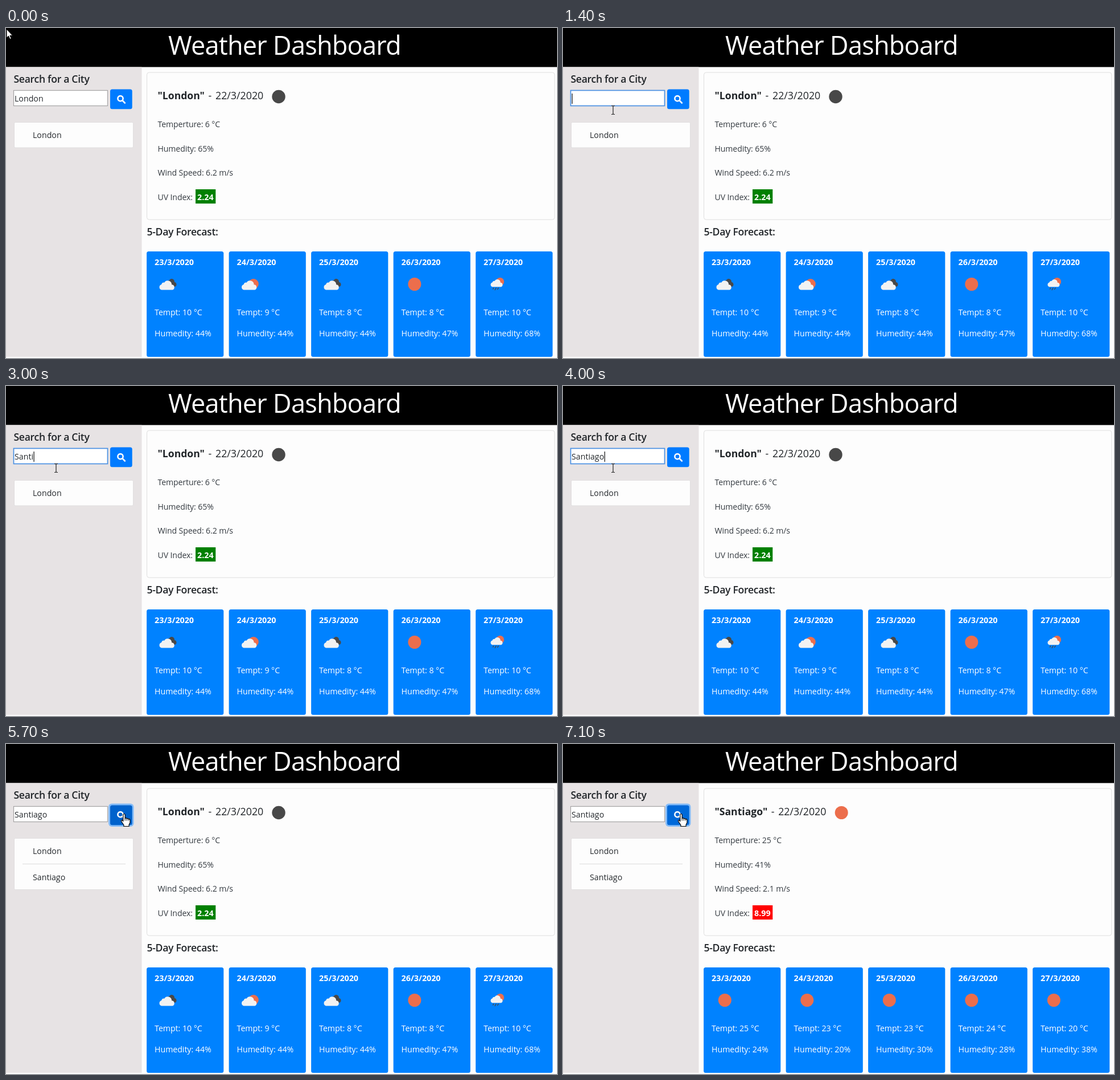
An HTML page that plays this animation: 968x579 px, repeating every 7.2 s.

```html
<!DOCTYPE html>
<html lang="en">
<head>
<meta charset="utf-8">
<title>Weather Dashboard</title>
<style>
  html, body { margin: 0; width: 100%; height: 100%; overflow: hidden; background: #fdfdfd; }
  svg { display: block; width: 968px; height: 579px; font-family: "Open Sans", "Noto Sans", sans-serif; }
  text { white-space: pre; }
  .title { font-size: 45px; letter-spacing: -.75px; fill: #fff; }
  .head { font-size: 17.6px; font-weight: 600; letter-spacing: -.3px; fill: #212529; }
  .city { font-size: 17.6px; font-weight: 700; fill: #212529; }
  .date { font-size: 17.8px; font-weight: 500; fill: #212529; }
  .body { font-size: 14.1px; letter-spacing: -.1px; fill: #343a40; }
  .entry { font-size: 14.2px; fill: #24282c; }
  .card { font-size: 14.2px; letter-spacing: -.05px; fill: #fff; }
  .strong { font-size: 14.3px; font-weight: 700; fill: #fff; }
</style>
</head>
<body>
<svg viewBox="0 0 968 579">
  <defs>
    <path id="cloud" d="M5 18a5 5 0 0 1 0-9.6 4.5 4.5 0 0 1 5-3.3 7 7 0 0 1 13 3.6 4.8 4.8 0 0 1 1.5 9.3z"/>
    <g id="sun"><circle cx="16.5" cy="11.5" r="11.5" fill="#ec6e4c"/></g>
    <g id="moon"><circle cx="16.5" cy="11.5" r="11.7" fill="#484848"/></g>
    <g id="clouds">
      <use href="#cloud" transform="translate(11.5 .5) scale(.73 .85)" fill="#484848"/>
      <use href="#cloud" transform="translate(.3 3.6)" fill="#f2f2f2"/>
    </g>
    <g id="partly">
      <circle cx="22.5" cy="11" r="9" fill="#ec6e4c"/>
      <use href="#cloud" transform="translate(.3 3.6)" fill="#f2f2f2"/>
    </g>
    <g id="rain">
      <circle cx="22.2" cy="7" r="7" fill="#ec6e4c"/>
      <use href="#cloud" transform="translate(4.5 1.8) scale(.8)" fill="#f2f2f2"/>
      <path d="M11 17.5l-1.5 3M15.5 17.5l-2.5 4.5M19.5 17.5l-2 3.5" stroke="#484848" stroke-width="1.5"/>
    </g>
  </defs>

  <rect width="968" height="579" fill="#fdfdfd"/>
  <rect width="968" height="68.5" fill="#000"/>
  <text class="title" x="285" y="47">Weather Dashboard</text>

  <rect y="68.5" width="238.5" height="508.5" fill="#e7e3e4"/>
  <text class="head" x="13.5" y="96">Search for a City</text>
  <rect id="box" x="13.5" y="109.5" width="165" height="27" fill="#fff"/>
  <rect id="mark" x="15" y="113" height="20" fill="#3390ff"/>
  <text id="field" class="entry" x="15" y="129"></text>
  <rect id="caret" y="115" width="1.2" height="18" fill="#111"/>
  <rect id="ring" x="180" y="104.5" width="44.5" height="40.5" rx="6" fill="#83bbf8"/>
  <rect id="button" x="183" y="107.5" width="38.7" height="34.7" rx="3.5"/>
  <g fill="none" stroke="#fff" stroke-width="2.6">
    <circle cx="201" cy="123.7" r="4.6"/>
    <path d="M204.5 127.2l4.3 4.3" stroke-linecap="round"/>
  </g>

  <rect id="list" x="14.5" y="165.5" width="209" rx="2" fill="#fdfdfd" stroke="#e0dedf"/>
  <text class="entry" x="47" y="193">London</text>
  <g id="second">
    <path d="M29 210.5H210" stroke="#dcdcdc"/>
    <text class="entry" x="47" y="238.5">Santiago</text>
  </g>

  <rect x="247.5" y="78" width="716.3" height="258.2" rx="4" fill="#fdfdfd" stroke="#dfdfdf"/>
  <text class="head" x="247.5" y="364">5-Day Forecast:</text>
  <g id="report"></g>
  <g id="cursor"></g>
</svg>
<script>
const LOOP = 7200, STEP = 100;
const $ = id => document.getElementById(id);

const london = {
  name: "London", shift: 0, icon: "moon", temp: 6, hum: 65, wind: 6.2, uv: "2.24", uvFill: "#008000",
  days: [["clouds", 10, 44], ["partly", 9, 44], ["clouds", 8, 44], ["sun", 8, 47], ["rain", 10, 68]]
};
const santiago = {
  name: "Santiago", shift: 10.2, icon: "sun", temp: 25, hum: 41, wind: 2.1, uv: "8.99", uvFill: "#ff0000",
  days: [["sun", 25, 24], ["sun", 23, 20], ["sun", 23, 30], ["sun", 24, 28], ["sun", 20, 38]]
};

const shapes = {
  arrow: `<path d="M0 0V15.2L3.5 12 6 17.6 8.3 16.6 5.9 11.2H10.6Z" fill="#fff" stroke="#000"/>`,
  beam: `<path d="M-3 -7.5H-1L0 -6.7 1 -7.5H3M0 -6.7V6.7M-3 7.5H-1L0 6.7 1 7.5H3" fill="none" stroke="#222" stroke-width="1.2"/>`,
  hand: `<path d="M-1.7 1.5Q0 -1.5 1.7 1.5V8Q3.4 6.6 4.8 8.4 6.6 7.4 7.8 9.3 10 8.6 10.5 11V15.5L8.6 19V22H-.6V19.5L-4.8 13.5Q-5.4 10.3 -3 11.4L-1.7 13Z" fill="#fff" stroke="#000" stroke-width="1.2" stroke-linejoin="round"/>
    <path d="M1.7 8V12M4.8 8.6V12M7.8 9.5V12" stroke="#000"/>`
};

// time, x, y of the pointer; straight lines between
const path = [[0, 1, 2], [400, 31, 76], [800, 16, 124], [900, 16, 124], [1200, 88, 144],
  [4500, 88, 144], [5000, 164, 141], [5300, 207.5, 122.5], [LOOP, 207.5, 122.5]];
const pointer = [[0, "arrow"], [700, "beam"], [5200, "hand"]];
const typed = [[0, "London"], [1400, ""], [2000, "S"], [2200, "Sa"], [2400, "San"], [2700, "Sant"],
  [2900, "Santi"], [3200, "Santia"], [3400, "Santiag"], [3700, "Santiago"]];
const caretOn = [[0, false], [1400, true], [1800, false], [2000, true], [4200, false]];
const selected = [[0, 0], [1000, 17], [1100, 43], [1200, 51], [1400, 0]];
const buttonFill = [[0, "#007bff"], [5200, "#0069d9"], [5500, "#0062cc"], [5800, "#0069d9"]];
const place = [[0, london], [6000, santiago]];

const at = (table, t) => table.findLast(row => row[0] <= t)[1];
const text = (cls, x, y, s) => `<text class="${cls}" x="${x}" y="${y}">${s}</text>`;
const icon = (name, x, y) => `<use href="#${name}" x="${x}" y="${y}"/>`;
const show = (id, on) => $(id).setAttribute("visibility", on ? "visible" : "hidden");

function position(t) {
  const i = path.findIndex(p => p[0] > t);
  const [t0, x0, y0] = path[i - 1], [t1, x1, y1] = path[i];
  const k = (t - t0) / (t1 - t0);
  return [x0 + (x1 - x0) * k, y0 + (y1 - y0) * k];
}

function card([name, temp, hum], i) {
  const x = 247.1 + 144.5 * i, left = x + 14;
  return `<rect x="${x}" y="392" width="135.2" height="185" rx="3.5" fill="#0082ff"/>` +
    text("strong", left, 416, `${23 + i}/3/2020`) + icon(name, x + 20.7, 438) +
    text("card", left, 504, `Tempt: ${temp} °C`) + text("card", left, 541, `Humedity: ${hum}%`);
}

function report(c) {
  return text("city", 266.5, 125, `"${c.name}"`) +
    text("date", 355.5 + c.shift, 125, "-") + text("date", 368 + c.shift, 125, "22/3/2020") +
    icon(c.icon, 462.5 + c.shift, 109) +
    text("body", 266.5, 174, `Temperture: ${c.temp} °C`) +
    text("body", 266.5, 216.5, `Humedity: ${c.hum}%`) +
    text("body", 266.5, 259, `Wind Speed: ${c.wind} m/s`) +
    text("body", 266.5, 301.5, "UV Index:") +
    `<rect x="333" y="283" width="35.3" height="25" fill="${c.uvFill}"/>` +
    text("strong", 336, 301.5, c.uv) + c.days.map(card).join("");
}

let drawnPlace, drawnShape;

function draw(t) {
  const city = at(place, t), shape = at(pointer, t);
  if (city !== drawnPlace) $("report").innerHTML = report(drawnPlace = city);
  if (shape !== drawnShape) $("cursor").innerHTML = shapes[drawnShape = shape];
  $("cursor").setAttribute("transform", `translate(${position(t)})`);

  const focused = t >= 1000 && t < 5500, sel = at(selected, t);
  $("box").setAttribute("stroke", focused ? "#4a90e2" : "#a5a3a4");
  $("box").setAttribute("stroke-width", focused ? 1.7 : 1.2);
  $("field").textContent = at(typed, t);
  $("field").style.fill = sel > 45 ? "#fff" : "";
  $("mark").setAttribute("width", sel);
  $("caret").setAttribute("x", 15.5 + $("field").getComputedTextLength());
  show("caret", at(caretOn, t));

  show("ring", t >= 5500);
  $("button").setAttribute("fill", at(buttonFill, t));
  show("second", t >= 5600);
  $("list").setAttribute("height", t >= 5600 ? 90 : 44.5);
}

const start = performance.now();
function tick() {
  const t = (performance.now() - start) % LOOP;
  draw(Math.floor(t / STEP) * STEP);
  requestAnimationFrame(tick);
}
tick();
</script>
</body>
</html>
```
